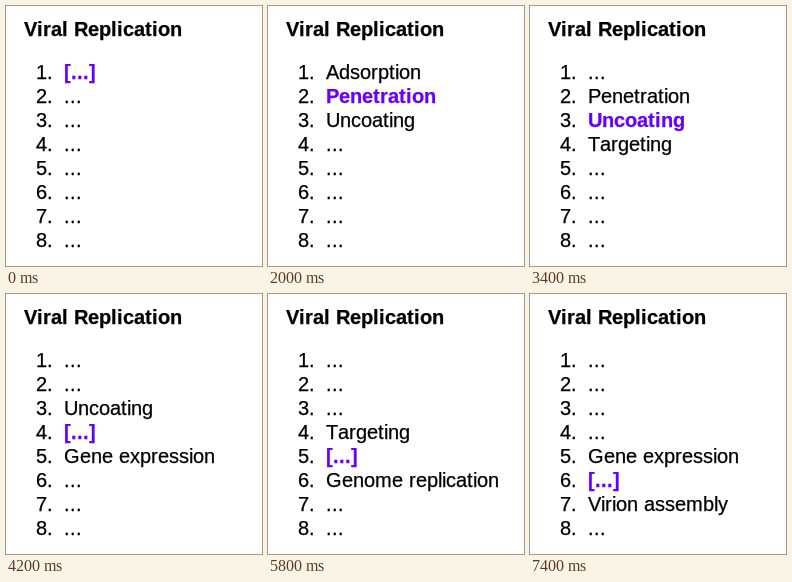
An HTML page with a canvas that plays this animation: 256x260 px, repeating every 8000 ms.

```html
<!DOCTYPE html>
<html lang="en">
<head>
<meta charset="utf-8">
<title>Viral Replication</title>
<style>
  html, body {
    margin: 0;
    width: 100%;
    height: 100%;
    overflow: hidden;
    background: #fff;
  }
  canvas { display: block; }
</style>
</head>
<body>
<canvas id="stage" width="256" height="260"></canvas>
<script>
const LOOP = 8000;
const STEP = 1400;
const REVEAL = 600;
const COUNT = 8;
const FONT = '20px "Liberation Sans", Arial, sans-serif';
const stages = [
  "Adsorption", "Penetration", "Uncoating", "Targeting",
  "Gene expression", "Genome replication", "Virion assembly"
];

const canvas = document.getElementById("stage");
const ctx = canvas.getContext("2d");

// Sets text on whole-pixel advances; a hairline gives the darker hinted weight.
function drawText(text, x, y, color = "#000", bold = false) {
  ctx.font = (bold ? "bold " : "") + FONT;
  ctx.fillStyle = ctx.strokeStyle = color;
  ctx.lineWidth = 0.25;
  ctx.lineJoin = "round";
  for (const char of text) {
    ctx.fillText(char, x, y);
    ctx.strokeText(char, x, y);
    x += Math.round(ctx.measureText(char).width);
  }
}

// The current stage is asked, then answered; its neighbours give context.
function label(i, current, answered) {
  if (i === current) return answered ? stages[i] : "[...]";
  const isNeighbour = current > 0 && Math.abs(i - current) === 1;
  return isNeighbour ? stages[i] : "...";
}

function render(time) {
  const t = time % LOOP;
  const current = Math.floor(t / STEP);
  const answered = t % STEP >= REVEAL;

  ctx.fillStyle = "#fff";
  ctx.fillRect(0, 0, canvas.width, canvas.height);
  drawText("Viral Replication", 18, 30, "#000", true);
  for (let i = 0; i < COUNT; i++) {
    const y = 73 + 24 * i;
    const active = i === current;
    drawText(`${i + 1}.`, 30, y);
    drawText(label(i, current, answered), 58, y, active ? "#60f" : "#000", active);
  }
}

const start = performance.now();

function tick() {
  render(performance.now() - start);
  requestAnimationFrame(tick);
}

tick();
</script>
</body>
</html>
```
